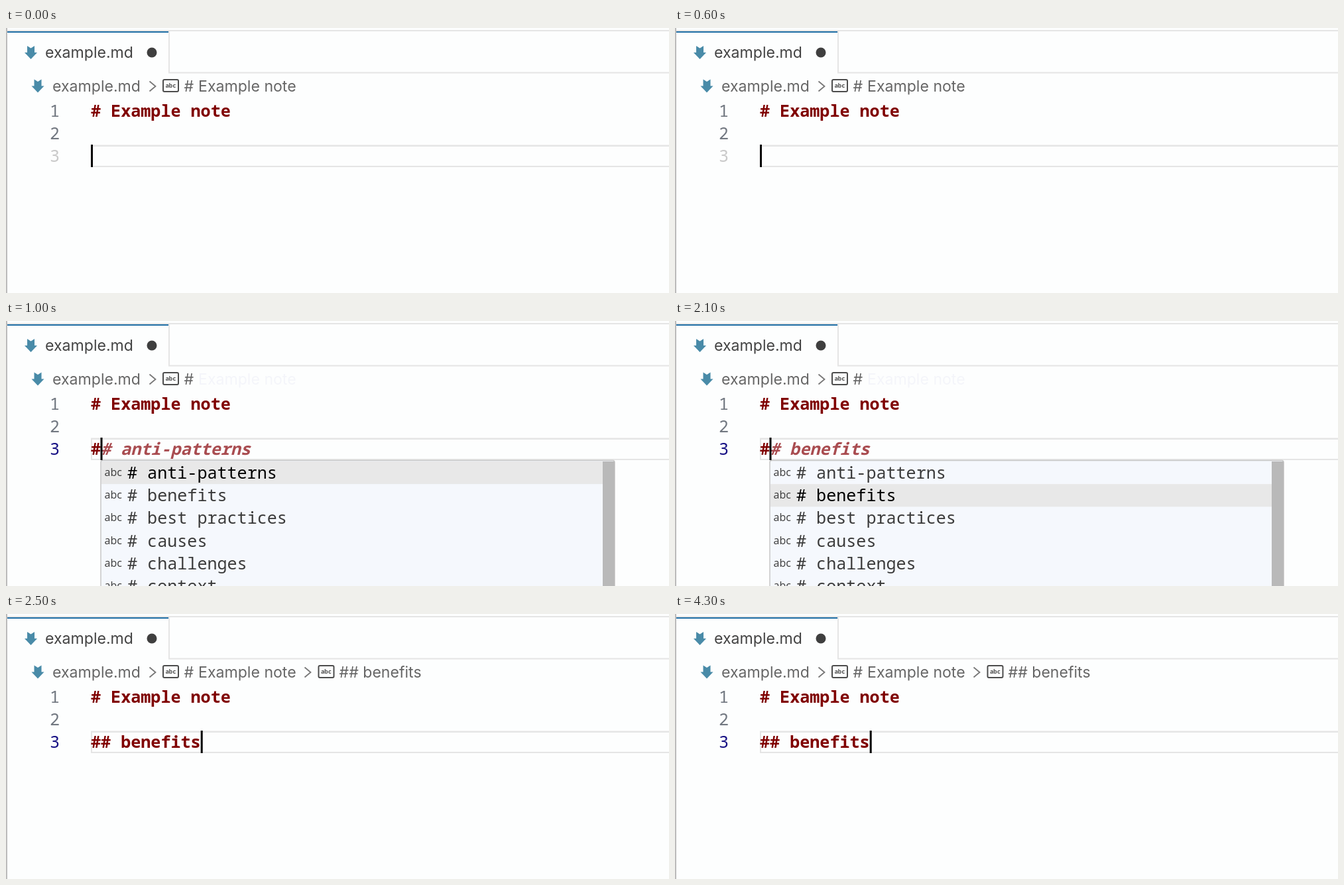
An HTML page for the animation above (5.5 s loop, 1000 px wide and 400 px high).

```html
<!DOCTYPE html>
<html lang="en">
<head>
<meta charset="utf-8">
<title>Heading completion</title>
<style>
  html, body { margin: 0; width: 100%; height: 100%; overflow: hidden; background: #fdfefe; }
  svg { display: block; width: 1000px; height: 400px; }
  text { white-space: pre; }
  .ui { font: 23.1px Inter, sans-serif; fill: #666; }
  .code { font: 25.1px "Noto Sans Mono", monospace; }
  .heading { font-weight: 700; fill: #800000; }
  .num { fill: #717780; text-anchor: end; }
  .ghost { font-style: italic; font-weight: 700; fill: #a94c50; }
  .kind { font: 16px "Open Sans", "Noto Sans", sans-serif; fill: #3b3b3b; }
  .tiny { font: 700 9px "Noto Sans Mono", monospace; fill: #4c4c4c; text-anchor: middle; }
  .line { fill: #e5e5e5; }
</style>
</head>
<body>
<svg viewBox="0 0 1000 400">
  <defs>
    <path id="arrow" d="M-5.5 -10 L0 -6.5 L5.5 -10 V0 H9.5 L0 10 L-9.5 0 H-5.5 Z" fill="#498ba8"/>
    <path id="chevron" d="M0 -7.5 L9 0 L0 7.5" fill="none" stroke="#777" stroke-width="1.8"/>
    <g id="symbol">
      <rect x="1" y="1" width="23" height="18" rx="2" fill="none" stroke="#4c4c4c" stroke-width="2"/>
      <text class="tiny" x="12.5" y="12.5">abc</text>
    </g>
  </defs>
  <rect width="1000" height="400" fill="#fdfefe"/>

  <!-- tab bar -->
  <rect class="line" y="3" width="1000" height="2"/>
  <rect class="line" x="245" y="5" width="2" height="63"/>
  <rect class="line" x="245" y="66.5" width="755" height="2"/>
  <rect x="2" y="5" width="243" height="2" fill="#1f6ea5"/>
  <rect width="2" height="400" fill="#bcbcbc"/>
  <use href="#arrow" x="37.5" y="37"/>
  <text class="ui" x="59" y="45" style="fill:#434343">example.md</text>
  <circle cx="220" cy="37" r="7.5" fill="#3f3f3f"/>

  <!-- breadcrumbs -->
  <use href="#arrow" x="48" y="87.5"/>
  <text class="ui" x="70" y="96">example.md</text>
  <use href="#chevron" x="216.5" y="88"/>
  <use href="#symbol" x="236" y="77"/>
  <text class="ui" x="268.5" y="96">#</text>
  <text class="ui" id="title" x="290" y="96">Example note</text>
  <g id="crumb">
    <use href="#chevron" x="450.5" y="88"/>
    <use href="#symbol" x="470.5" y="77"/>
    <text class="ui" x="502.5" y="96">## benefits</text>
  </g>

  <!-- editor -->
  <rect class="line" x="128" y="176.5" width="872" height="2.5"/>
  <rect class="line" x="128" y="208" width="872" height="2"/>
  <rect class="line" x="128" y="177" width="2" height="33"/>
  <text class="code num" x="81" y="134">1</text>
  <text class="code num" x="81" y="168">2</text>
  <text class="code num" id="current" x="81" y="202">3</text>
  <text class="code heading" x="128" y="134"># Example note</text>
  <text class="code heading" id="typed" x="128" y="202"></text>
  <text class="code ghost" id="ghost" x="143" y="202"></text>

  <!-- suggestions -->
  <g id="popup">
    <rect x="143" y="210.5" width="775" height="220" rx="3" fill="#f5f8fd" stroke="#c6c6c6" stroke-width="1.5"/>
    <rect id="selected" x="144" width="756" height="34.2" fill="#e8e8e8"/>
    <rect x="900" y="212" width="18" height="200" fill="#b9b9b9"/>
    <g id="rows"></g>
  </g>
  <rect id="cursor" y="176" width="3" height="34" fill="#000"/>
</svg>
<script>
  const $ = id => document.getElementById(id);
  const words = ["anti-patterns", "benefits", "best practices", "causes", "challenges", "context"];
  const rowHeight = 34.2;
  const loop = 5500;
  const steps = [
    { at: 0, typed: "", pick: -1, cursor: 128, number: "#c9c9c9" },
    { at: 1000, typed: "#", pick: 0, cursor: 142.5, number: "#171184" },
    { at: 1500, typed: "#", pick: 1, cursor: 142.5, number: "#171184" },
    { at: 2500, typed: "## benefits", pick: -1, cursor: 293.7, number: "#171184" }
  ];

  function addText(className, x, y, content) {
    const node = document.createElementNS("http://www.w3.org/2000/svg", "text");
    node.setAttribute("class", className);
    node.setAttribute("x", x);
    node.setAttribute("y", y);
    node.textContent = content;
    $("rows").append(node);
    return node;
  }

  const labels = words.map((word, i) => {
    const y = 238 + i * rowHeight;
    addText("kind", 148.5, y - 4, "abc");
    return addText("code", 183, y, "# " + word);
  });

  function show(step) {
    const open = step.pick >= 0;
    $("typed").textContent = step.typed;
    $("ghost").textContent = open ? "# " + words[step.pick] : "";
    $("cursor").setAttribute("x", step.cursor);
    $("current").style.fill = step.number;
    $("title").style.fill = open ? "#f4f5fa" : "#666";
    $("crumb").style.display = step.typed.length > 1 ? "" : "none";
    $("popup").style.display = open ? "" : "none";
    $("selected").setAttribute("y", 212 + Math.max(step.pick, 0) * rowHeight);
    labels.forEach((label, i) => label.style.fill = i === step.pick ? "#000" : "#3b3b3b");
  }

  const start = performance.now();
  let shown;
  function tick() {
    const t = (performance.now() - start) % loop;
    const step = steps.filter(s => s.at <= t).pop();
    if (step !== shown) show(shown = step);
    requestAnimationFrame(tick);
  }
  tick();
</script>
</body>
</html>
```
